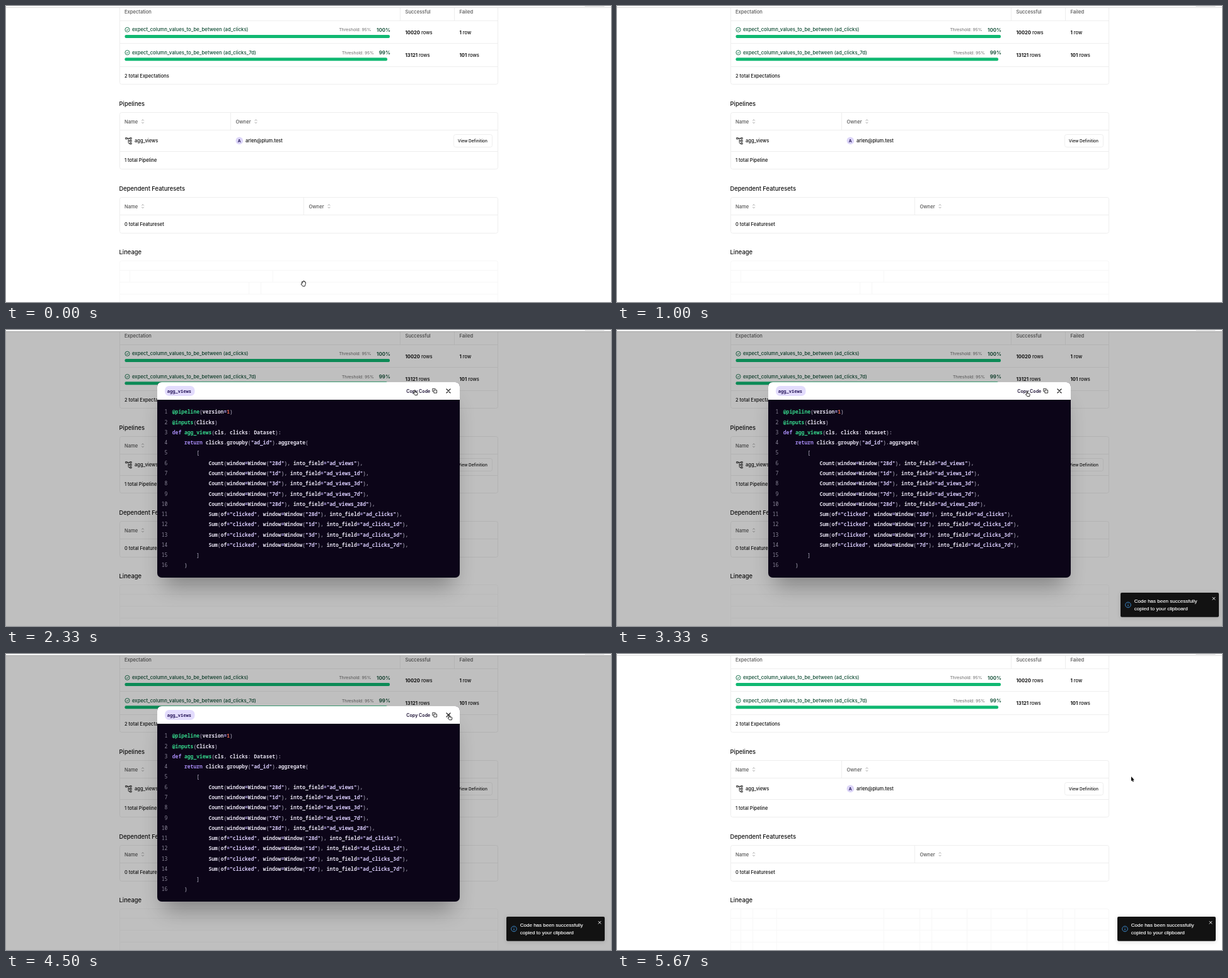
These frames come from a looping animation (960 px wide and 471 px high, 6.35 s). An HTML page:

```html
<!DOCTYPE html>
<html lang="en">
<head>
<meta charset="utf-8">
<title>Pipeline definition</title>
<style>
  html, body { margin: 0; width: 100%; height: 100%; overflow: hidden; background: #fff; }
  svg { display: block; width: 100%; height: 100%; }
  text { font: 500 7.5px Inter, sans-serif; fill: #111; white-space: pre; }
  .title { font-size: 9.4px; }
  .head { font-size: 7.6px; fill: #555; }
  .check { font-size: 7.72px; fill: #0b4a31; }
  .limit { font-size: 6.7px; fill: #7d7d7d; }
  .score { font-size: 8px; font-weight: 600; fill: #0b4a31; text-anchor: end; }
  .count { font-size: 7.6px; }
  .count tspan { font-weight: 700; }
  .button { font-size: 6.5px; }
  .line { fill: none; stroke: #eee; }
  .faint { fill: none; stroke: #f7f7f7; }
  .bar { fill: #10b872; }
  .icon { fill: none; stroke: #222; stroke-width: .9; stroke-linecap: round; stroke-linejoin: round; }
  .mono text, text.mono { font: 600 8px "Noto Sans Mono", monospace; fill: #8b8799; }
  .mono .number { fill: #8b8799; font-weight: 500; text-anchor: end; }
  .deco { fill: #35d48a; }
  .str { fill: #d8ccfb; }
  .key { fill: #a68bf2; }
  .num { fill: #ec6a50; }
  .op { fill: #b9a8ee; }
  .name { fill: #e2deec; }
  #toast text { font: 8px "Liberation Sans", Arial, sans-serif; fill: #fff; stroke: #fff; stroke-width: .15; }
  .shadow { opacity: .3; filter: blur(17px); }
  .cursor { stroke: #fff; stroke-width: .9; paint-order: stroke; stroke-linejoin: round; }
  .hand { fill: #fff; stroke: #111; stroke-width: .9; stroke-linejoin: round; }
</style>
</head>
<body>
<svg viewBox="0 0 960 471">
  <defs>
    <path id="sort" d="M-1.7-1.2 0-2.9 1.7-1.2M-1.7 1.2 0 2.9 1.7 1.2" fill="none" stroke="#8a8a8a" stroke-width=".8"/>
    <g id="tick" fill="none" stroke="#0e6b45" stroke-width=".9">
      <circle r="3.6"/><path d="M-1.6.1-.4 1.3 1.7-1.1"/>
    </g>
  </defs>

  <g id="page">
    <rect x="918" y="-3" width="32" height="4" rx="1.5" fill="#d9d9d9"/>
    <path d="M0 2.5H960" stroke="#dcdcdc"/>

    <path class="line" d="M180.5 3V121.5a3 3 0 0 0 3 3H777.5a3 3 0 0 0 3-3V3M180 23.5H780M180 59.5H780M180 96.5H780M625.5 3V23M711.5 3V23"/>
    <text class="head" x="188" y="12">Expectation</text>
    <text class="head" x="633.5" y="12">Successful</text>
    <text class="head" x="719.5" y="12">Failed</text>
    <g id="checks"></g>
    <text x="188" y="113.5">2 total Expectations</text>

    <text class="title" x="179.5" y="158.7">Pipelines</text>
    <rect class="line" x="180.5" y="169.5" width="600" height="90" rx="3"/>
    <path class="line" d="M180 197.5H780M180 231.5H780M356.5 170V197"/>
    <text class="head" x="188" y="186.5">Name</text><use href="#sort" x="217" y="183.7"/>
    <text class="head" x="364.5" y="186.5">Owner</text><use href="#sort" x="396.5" y="183.7"/>
    <path class="icon" d="M190 209.6h2.2v2.2h-2.2zM192.2 210.7H197M194.2 210.7V217.8a1 1 0 0 0 1 1H197M194.2 214.7H197M197 209.6h2.2v2.2H197zM197 213.6h2.2v2.2H197zM197 217.7h2.2v2.2H197z"/>
    <text x="204" y="217.3">agg_views</text>
    <circle cx="370.3" cy="214.4" r="5.8" fill="#dcd5f8"/>
    <text x="370.3" y="216.8" style="font-size:6.6px;font-weight:700;fill:#2a1d5e;text-anchor:middle">A</text>
    <text x="380" y="217.3">arlen@plum.test</text>
    <rect class="line" x="710.5" y="204.5" width="61" height="20" rx="3"/>
    <text class="button" x="717" y="216.9">View Definition</text>
    <text x="188" y="248.4">1 total Pipeline</text>

    <text class="title" x="179.5" y="293.7">Dependent Featuresets</text>
    <rect class="line" x="180.5" y="304.5" width="600" height="57" rx="3"/>
    <path class="line" d="M180 332.5H780M472.5 305V332"/>
    <text class="head" x="188" y="321.5">Name</text><use href="#sort" x="217" y="318.7"/>
    <text class="head" x="480.5" y="321.5">Owner</text><use href="#sort" x="512.5" y="318.7"/>
    <text x="188" y="350">0 total Featureset</text>

    <text class="title" x="179.5" y="395.2">Lineage</text>
    <path class="faint" d="M180.5 471V408.5a3 3 0 0 1 3-3H777.5a3 3 0 0 1 3 3V471M181 420.5H780M181 439.5H780M181 458.5H780"/>
    <path id="gridStart" class="faint" d="M196.5 420V439M423.5 420V439M385.5 439V458M404.5 439V458"/>
    <path id="gridEnd" class="faint"/>
  </g>

  <g id="modal">
    <rect y="2" width="960" height="469" opacity=".25"/>
    <rect class="shadow" x="250" y="117" width="460" height="291" rx="7"/>
    <rect x="240" y="83" width="480" height="311" rx="7" fill="#0c0518"/>
    <path d="M240 111V90a7 7 0 0 1 7-7H713a7 7 0 0 1 7 7V111Z" fill="#fff"/>
    <rect x="252" y="89" width="47.5" height="16" rx="7" fill="#e3dcfd"/>
    <text class="mono" x="255.8" y="99.6" style="font-size:7.1px;fill:#2a1a5c">agg_views</text>
    <text x="635.3" y="99.6" style="font-size:7.1px;font-weight:600;fill:#150a2e">Copy Code</text>
    <path class="icon" d="M679.3 95.6h4.3v4.6h-4.3zM677.9 97.8H676.8V93.3H681.2V94.2"/>
    <path class="icon" style="stroke-width:1.3" d="M699 94 705 100M705 94 699 100"/>
    <g id="code" class="mono"></g>
  </g>

  <g id="toast">
    <rect x="794" y="418" width="156" height="38.7" rx="2" fill="#121212" style="filter:drop-shadow(0 1px 3px rgba(0,0,0,.15))"/>
    <circle cx="806" cy="437.4" r="4.3" fill="none" stroke="#3f93dc" stroke-width=".9"/>
    <path d="M806 437V439.8M806 434.8V435.8" stroke="#3f93dc"/>
    <text x="815.8" y="434.2">Code has been successfully</text>
    <text x="815.8" y="446.2">copied to your clipboard</text>
    <path d="M939.8 425.1 944.2 429.5M944.2 425.1 939.8 429.5" stroke="#eee"/>
  </g>

  <g id="cursor">
    <path id="arrow" class="cursor" d="M0 0V7.3L1.6 6 2.6 8.4 3.8 7.9 2.8 5.5H4.9Z"/>
    <path id="hand" class="hand" d="M2 5.4V1.2a.7.7 0 0 1 1.4 0V3.8l3 .6a1 1 0 0 1 .8 1L6.6 8.6H2.9L.6 5.8a.7.7 0 0 1 1-.9Z"/>
    <path id="grab" class="hand" d="M1.8 5.3 1.3 2.4a.6.6 0 0 1 1.2-.2l.4 1V1.4a.6.6 0 0 1 1.2 0V1a.6.6 0 0 1 1.2 0V1.7a.6.6 0 0 1 1.2 0V3a.6.6 0 0 1 1.1.2L7 6.4 6 9H3L.5 6.2a.7.7 0 0 1 1-1Z"/>
  </g>
</svg>

<script>
const LOOP = 6350, FPS = 6;
const $ = id => document.getElementById(id);
const show = (id, on) => $(id).setAttribute('visibility', on ? 'inherit' : 'hidden');
const move = (id, x, y) => $(id).setAttribute('transform', `translate(${x} ${y})`);

const checks = [
  ['ad_clicks', 100, 528.5, 609, '10020', '1', 'row'],
  ['ad_clicks_7d', 99, 533, 605, '13121', '101', 'rows']
];
$('checks').innerHTML = checks.map(([field, score, limitX, end, passed, failed, unit], i) => {
  const y = 37.7 + 36.4 * i;
  return `<use href="#tick" x="192.5" y="${y}"/>
    <text class="check" x="200" y="${y + 2.7}">expect_column_values_to_be_between (${field})</text>
    <text class="limit" x="${limitX}" y="${y + 2.4}">Threshold: 95%</text>
    <text class="score" x="610" y="${y + 2.9}">${score}%</text>
    <rect class="bar" x="188.5" y="${y + 8.2}" width="${end - 188.5}" height="5" rx="2"/>
    <text class="count" x="633.5" y="${y + 7}"><tspan>${passed}</tspan> rows</text>
    <text class="count" x="719.5" y="${y + 7}"><tspan>${failed}</tspan> ${unit}</text>`;
}).join('');

const counts = [['28d', ''], ['1d', '_1d'], ['3d', '_3d'], ['7d', '_7d'], ['28d', '_28d']];
const source = [
  '@pipeline(version=1)',
  '@inputs(Clicks)',
  'def agg_views(cls, clicks: Dataset):',
  '    return clicks.groupby("ad_id").aggregate(',
  '        [',
  ...counts.map(([span, tail]) =>
    `            Count(window=Window("${span}"), into_field="ad_views${tail}"),`),
  ...counts.slice(0, 4).map(([span, tail]) =>
    `            Sum(of="clicked", window=Window("${span}"), into_field="ad_clicks${tail}"),`),
  '        ]',
  '    )'
];
const token = /(?<deco>@\w+|agg_views(?=\())|(?<str>"[^"]*")|(?<key>\b(?:def|return)\b)|(?<num>\b\d+\b)|(?<op>=)|(?<name>\w+)/g;
const paint = line => line.replace(token, (word, ...rest) => {
  const groups = rest.at(-1);
  const kind = Object.keys(groups).find(k => groups[k] !== undefined);
  return `<tspan class="${kind}">${word}</tspan>`;
});
$('code').innerHTML = source.map((line, i) => {
  const y = 133.4 + 16.27 * i;
  return `<text class="number" x="256.3" y="${y}">${i + 1}</text><text x="263.8" y="${y}">${paint(line)}</text>`;
}).join('');

$('gridEnd').setAttribute('d', [0, 1, 3, 12, 15, 16, 19, 21, 24, 27, 28]
  .map(i => `M${Math.round(196 + 18.92 * i) + .5} 406V471`).join(''));

// Cursor stops: step, x, y, shape worn from that step on
const stops = [
  [0, 468, 437, 'grab'], [1, 490, 420, 'arrow'], [5, 740, 217, 'arrow'], [6, 740, 217, ''],
  [7, 739.5, 216.7, 'arrow'], [14, 646, 95, 'hand'], [16, 648, 97, 'hand'], [20, 648, 97, 'hand'],
  [21, 650, 97, 'arrow'], [26, 700, 96, 'hand'], [29, 702.5, 97, 'arrow'], [31, 816, 194.7, 'arrow'],
  [34, 816, 195, 'arrow']
];
const smooth = p => p * p * (3 - 2 * p);
const mix = (a, b, p) => a + (b - a) * p;

function cursorAt(step) {
  const i = stops.findLastIndex(s => s[0] <= step);
  const a = stops[i], b = stops[i + 1] || a;
  const p = a === b ? 0 : smooth((step - a[0]) / (b[0] - a[0]));
  return { x: mix(a[1], b[1], p), y: mix(a[2], b[2], p), shape: a[3] };
}

// Bounce in from the right: time in ms, offset in px
const bounce = [[2810, 1500], [3230, -12], [3335, 5], [3440, -2.5], [3510, 0]];
function toastOffset(ms) {
  const i = bounce.findLastIndex(b => b[0] <= ms);
  if (i < 0) return 1500;
  const a = bounce[i], b = bounce[i + 1];
  return b ? mix(a[1], b[1], 1 - (1 - (ms - a[0]) / (b[0] - a[0])) ** 3) : 0;
}

function render(ms) {
  const step = Math.floor((ms + 4) * FPS / 1000);
  const { x, y, shape } = cursorAt(step);
  move('cursor', x, y);
  for (const id of ['arrow', 'hand', 'grab']) show(id, id === shape);
  show('modal', step >= 7 && step < 29);
  show('gridStart', step < 7);
  show('gridEnd', step >= 34);
  move('toast', toastOffset(step * 1000 / FPS), 0);
}

let start;
function tick(now) {
  start ??= now;
  render((now - start) % LOOP);
  requestAnimationFrame(tick);
}
render(0);
requestAnimationFrame(tick);
</script>
</body>
</html>
```
